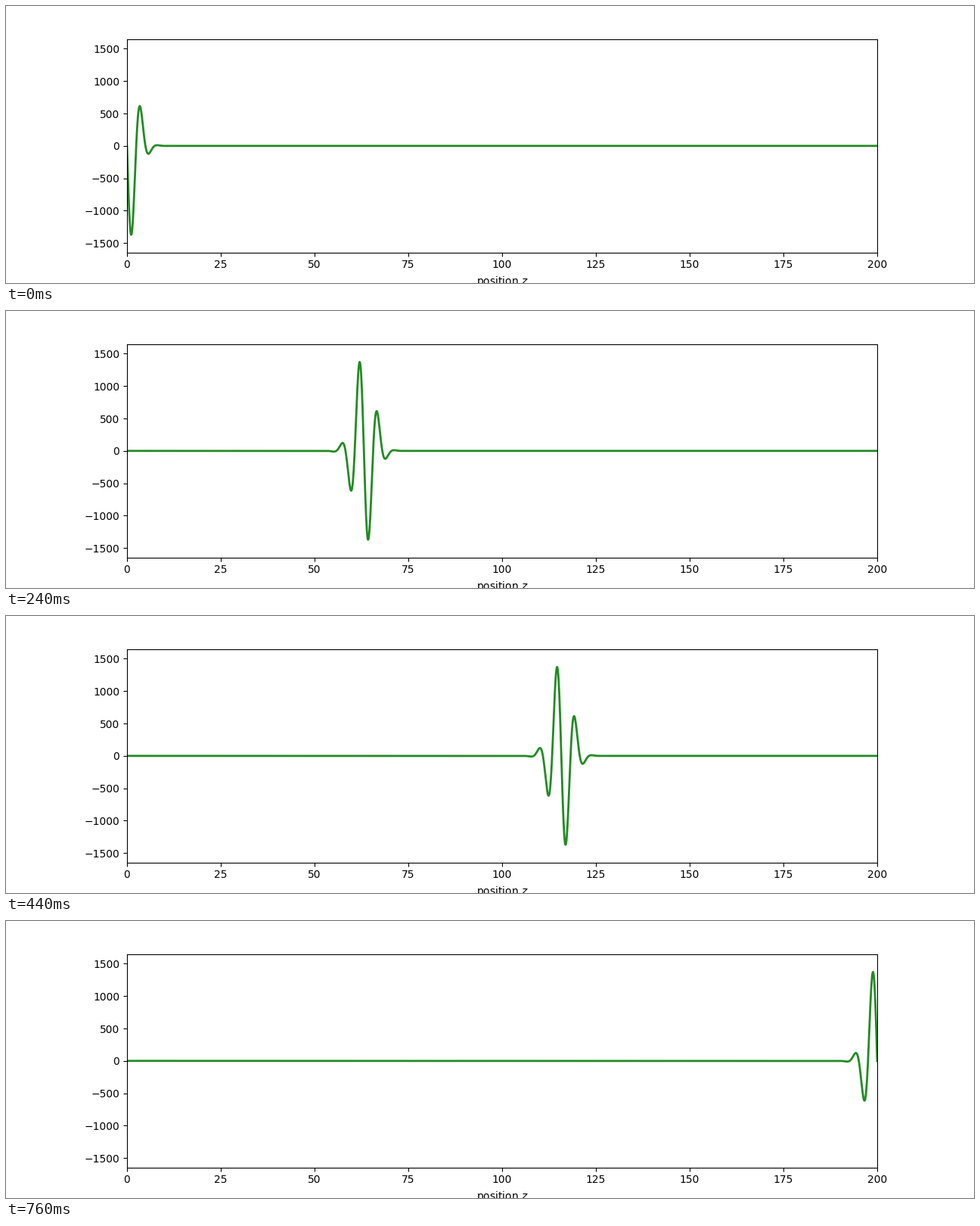
A matplotlib script for the animation above (800 ms loop, 1280x366 px).

```python
import numpy as np
import matplotlib.pyplot as plt
from matplotlib.animation import FuncAnimation

FRAMES = 20
INTERVAL = 40
LENGTH = 200
AMPLITUDE = 1517
WAVE_NUMBER = 1.28
WIDTH_SQ = 13.8

z = np.linspace(0, LENGTH, 2000)
centers = np.linspace(0, LENGTH, FRAMES)


def pulse(center):
    """Odd wave packet: a sine carrier under a Gaussian envelope."""
    u = z - center
    return -AMPLITUDE * np.sin(WAVE_NUMBER * u) * np.exp(-u**2 / WIDTH_SQ)


fig, ax = plt.subplots(figsize=(12.8, 3.66), dpi=100)
ax.set_xlim(0, LENGTH)
ax.set_ylim(-1645, 1645)
ax.set_xlabel("position $z$")
line, = ax.plot(z, pulse(centers[0]), color="forestgreen", linewidth=2)


def update(frame):
    line.set_ydata(pulse(centers[frame]))
    return line,


def reset():
    return update(0)


anim = FuncAnimation(fig, update, frames=FRAMES, init_func=reset,
                     interval=INTERVAL, repeat=True, repeat_delay=0)
plt.show()
```
